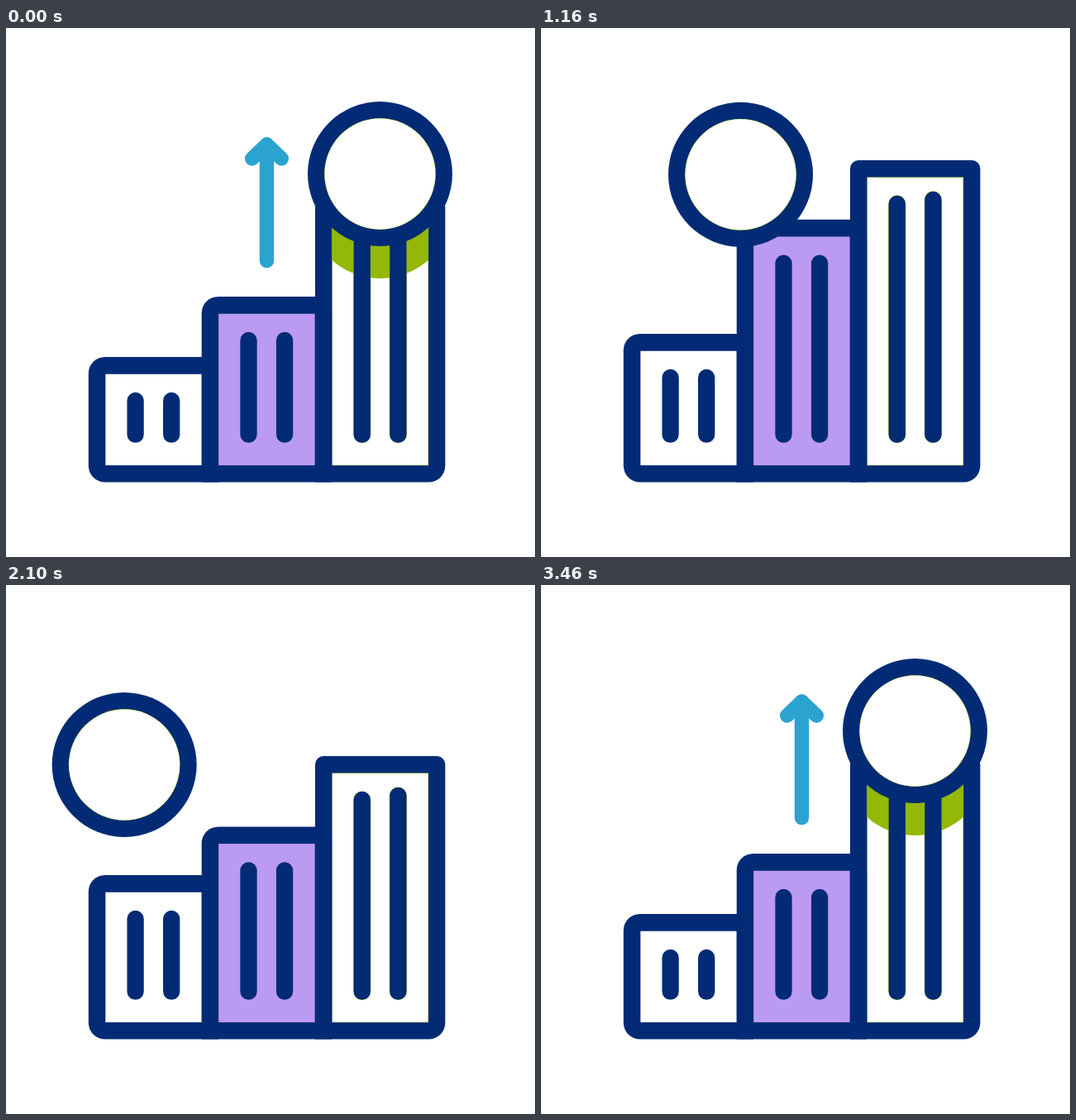
Animation of 640x640 px, one loop 3540 ms. Source, as an HTML page with a canvas:

```html
<!DOCTYPE html>
<html>
<head>
<meta charset="utf-8">
<style>
html, body { margin: 0; width: 100%; height: 100%; overflow: hidden; background: #fff; }
canvas { display: block; }
</style>
</head>
<body>
<canvas id="stage" width="640" height="640"></canvas>
<script>
const ctx = document.getElementById('stage').getContext('2d');
const LOOP = 3540, STEP = 20, BASE = 549.5, GRAVITY = 0.00183;
const NAVY = '#032b75', PURPLE = '#bb9af3', GREEN = '#93b807', BLUE = '#2aa3d0';
const HOME = { x: 452.5, y: 176.5 };

const ramp = (t, from, to) => Math.min(1, Math.max(0, (t - from) / (to - from)));
const smooth = p => p * p * (3 - 2 * p);
const mix = (a, b, p) => a + (b - a) * p;
const bump = (t, from, to) => Math.sin(Math.PI * ramp(t, from, to)) ** 2;

// Each bar sinks under the ball, then springs up to pass it on
const shortBar = {
  x: 99.8, top: 398, radii: [20, 0, 0, 20], fill: '#fff', lean: 0,
  lift: t => -114.5 * bump(t, 908, 2439)
};
const middleBar = {
  x: 236.7, top: 325, radii: [20, 20, 0, 0], fill: PURPLE, lean: 0,
  lift: t => 12 * bump(t, 370, 694) - 156 * bump(t, 694, 2350)
};
const tallBar = {
  x: 374, top: 207, radii: [10, 10, 20, 0], fill: '#fff', lean: 5, edge: GREEN,
  lift: t => 19 * bump(t, 160, 680) - 48 * bump(t, 680, 1560)
};

// A straight move bent into a parabola by gravity
function hop(t, t0, t1, a, b, gravity = GRAVITY) {
  const p = ramp(t, t0, t1);
  return {
    x: mix(a.x, b.x, p),
    y: mix(a.y, b.y, p) - gravity * (t1 - t0) ** 2 * p * (1 - p)
  };
}

function ballAt(t) {
  const land = { x: 307, y: 261 }, leave = { x: 276.4, y: 271 };
  const low = { x: 180, y: 270 }, hang = { x: 142.5, y: 216.5 };
  if (t < 540) return hop(t, 120, 540, HOME, land);
  if (t < 990) return hop(t, 540, 990, land, leave, 0);
  if (t < 1460) return hop(t, 990, 1460, leave, low);
  const rise = 1 - (1 - ramp(t, 1460, 2260)) ** 2.5;
  const fall = (Math.max(0, t - 2260) / 620) ** 2;
  return {
    x: mix(low.x, hang.x, rise) - 95 * fall,
    y: mix(low.y, hang.y, rise) + 138 * fall
  };
}

function line(color, width, ...points) {
  ctx.strokeStyle = color;
  ctx.lineWidth = width;
  ctx.lineCap = ctx.lineJoin = 'round';
  ctx.beginPath();
  points.forEach(p => ctx.lineTo(...p));
  ctx.stroke();
}

function disc({ x, y }, r, color) {
  ctx.fillStyle = color;
  ctx.beginPath();
  ctx.arc(x, y, r, 0, Math.PI * 2);
  ctx.fill();
}

function drawBall(at) {
  disc(at, 87.5, NAVY);
  disc(at, 67.4, GREEN);
  disc(at, 67, '#fff');
}

function drawBar({ x, top, radii, fill, lean, edge, lift }, t, shadow) {
  const y = top + lift(t);
  const inner = [x + 20.4, y + 20.5, 116.7, 508.8 - y];
  ctx.fillStyle = NAVY;
  ctx.beginPath();
  ctx.roundRect(x, y, 157.4, BASE - y, radii);
  ctx.fill();
  ctx.save();
  ctx.beginPath();
  ctx.rect(...inner);
  ctx.clip();
  ctx.fillStyle = fill;
  ctx.fillRect(...inner);
  if (shadow) disc(shadow, 87.5, GREEN);
  if (edge) {
    ctx.strokeStyle = edge;
    ctx.lineWidth = 1;
    ctx.strokeRect(...inner);
  }
  ctx.restore();
  for (const i of [0, 1]) {
    const sx = x + 56.8 + i * 43.6;
    const ends = [[sx, y + 52.9 - lean * i], [sx, 491.7]];
    if (edge) line(edge, 21, ...ends);
    line(NAVY, 20.3, ...ends);
  }
}

// The shaft is trimmed from its foot, the head from its right end
function drawArrow(cut) {
  if (cut >= 1) return;
  const tip = [315.5, 141], left = [297.7, 158];
  const end = [333.3 - 35.6 * cut, 141 + 17 * Math.abs(1 - 2 * cut)];
  line(BLUE, 17.5, [315.5, 281.5 - 140.5 * cut], tip);
  line(BLUE, 17.5, left, cut < 0.5 ? tip : end, end);
}

function draw(t) {
  ctx.clearRect(0, 0, 640, 640);
  const landing = t > 2660;
  const ball = ballAt(t);
  const next = { x: HOME.x, y: mix(-110, HOME.y, smooth(ramp(t, 2660, 3380))) };
  const depth = landing ? ramp(t, 3160, 3400) : 1 - ramp(t, 120, 260);
  const caster = landing ? next : ball;

  drawBar(shortBar, t);
  drawBar(tallBar, t, depth > 0 && { x: caster.x, y: caster.y + 39 * depth });
  drawBar(middleBar, t);
  drawBall(ball);
  if (landing) drawBall(next);
  drawArrow(landing ? 1 - ramp(t, 3100, 3400) : ramp(t, 120, 428));
}

const start = performance.now();
function tick() {
  const t = (performance.now() - start) % LOOP;
  draw(Math.floor(t / STEP) * STEP);
  requestAnimationFrame(tick);
}
tick();
</script>
</body>
</html>
```
